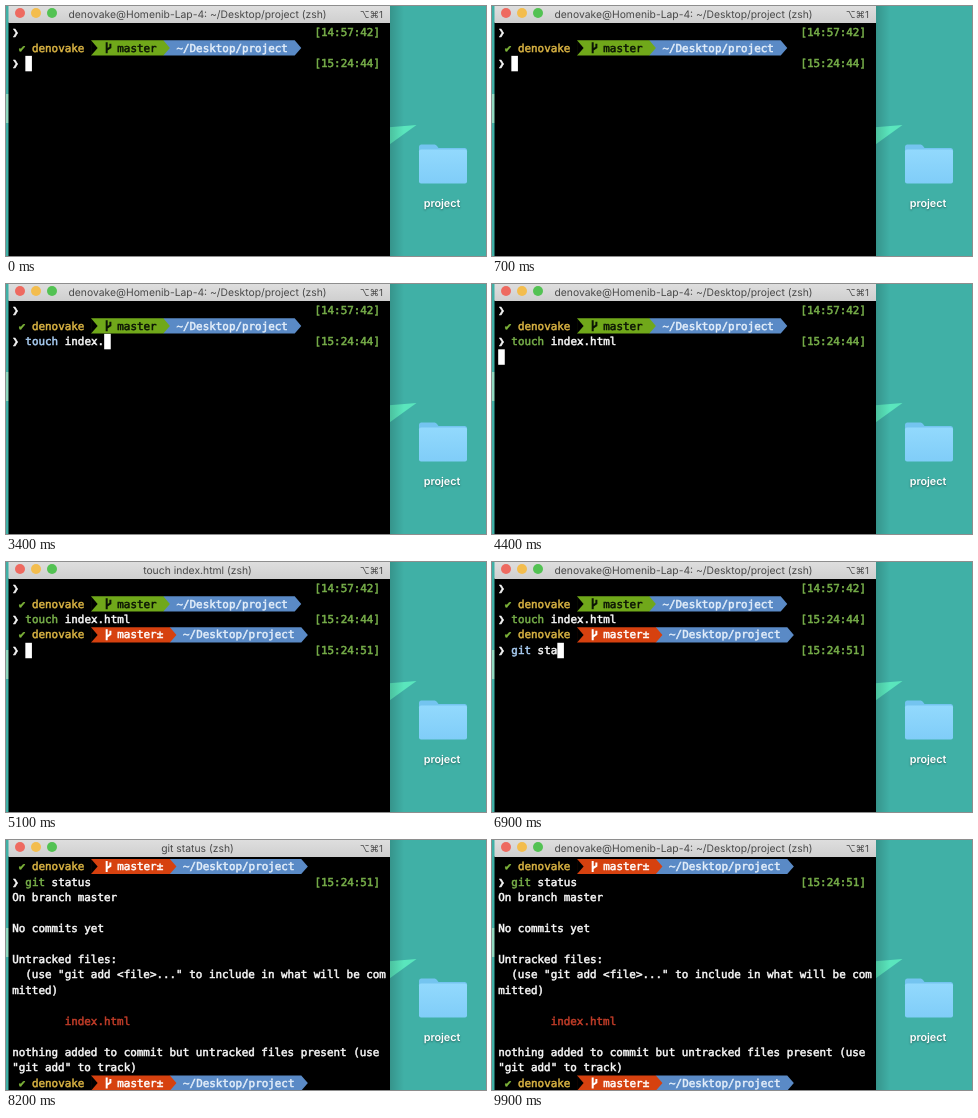
These frames come from a looping animation (480x250 px, 10 s). An HTML page:

```html
<!DOCTYPE html>
<html lang="en">
<head>
<meta charset="utf-8">
<title>Terminal</title>
<style>
  html, body { margin: 0; width: 100%; height: 100%; overflow: hidden; background: #40b0a6; }
  svg { display: block; }
  text { white-space: pre; text-rendering: geometricPrecision; }
  #term text { font: 10.9px "DejaVu Sans Mono", monospace; stroke-width: .5px; }
  .ui { font: 10.35px Inter, "Open Sans", sans-serif; fill: #484848; }
  .keys { font-size: 9.6px; }
  .label { font: 600 10.8px Inter, "Open Sans", sans-serif; fill: #fff; text-shadow: 0 1px 2px #0006; }
</style>
</head>
<body>
<svg width="480" height="250" viewBox="0 0 480 250">
  <defs>
    <linearGradient id="bar" x2="0" y2="1">
      <stop stop-color="#dedede"/><stop offset="1" stop-color="#cfcfcf"/>
    </linearGradient>
    <linearGradient id="shade">
      <stop stop-color="#000" stop-opacity=".16"/><stop offset="1" stop-color="#000" stop-opacity="0"/>
    </linearGradient>
    <linearGradient id="front" x2="0" y2="1">
      <stop stop-color="#92d9fd"/><stop offset="1" stop-color="#80cdf8"/>
    </linearGradient>
  </defs>

  <rect width="480" height="250" fill="#40b0a6"/>
  <path d="M0 88H3V117H0Z" fill="#8fd9c0"/>
  <path d="M380 121.500L410.500 119L380 141Z" fill="#5ae6bd"/>
  <rect x="384" width="14" height="250" fill="url(#shade)"/>

  <path d="M413 141q0-2.500 2.500-2.500h13q1.500 0 2.500 1.500l1.500 2h26q2.500 0 2.500 2.500V160H413Z" fill="#74c4f0"/>
  <rect x="413" y="143.500" width="48" height="34" rx="2" fill="url(#front)"/>
  <text class="label" x="436" y="201" text-anchor="middle">project</text>

  <rect x="2.500" y="16" width="381.500" height="234"/>
  <g id="term"></g>
  <rect x="2.500" width="381.500" height="17" fill="url(#bar)"/>
  <circle cx="14" cy="7" r="5" fill="#ee6a60"/>
  <circle cx="30" cy="7" r="5" fill="#f3bd4e"/>
  <circle cx="46" cy="7" r="5" fill="#53c253"/>
  <text class="ui" id="title" x="191.500" y="12" text-anchor="middle"></text>
  <text class="ui keys" x="377" y="12" text-anchor="end">⌥⌘1</text>
</svg>

<script>
const LOOP = 10000, CELL = 6.57, LINE = 15.47, LEFT = 6.2, TOP = 18.9;
const USER = "denovake", HOME = USER + "@Homenib-Lap-4: ~/Desktop/project (zsh)";
const WHITE = "#f8f8f8", GREEN = "#78b04a", BLUE = "#a9cdf3", RED = "#c03c28";
const term = document.getElementById("term"), title = document.getElementById("title");

const commands = [
  { text: "touch index.html", time: "15:24:44", enter: 4400, titled: [4900, 5200],
    keys: [1100, 1300, 1500, 1700, 1900, 2200, 2400, 2600, 2800, 3000, 3200, 3400, 3600, 3800, 4000, 4200] },
  { text: "git status", time: "15:24:51", enter: 7700, titled: [8000, 8300],
    keys: [5500, 5700, 5900, 6100, 6300, 6600, 6900, 7100, 7300, 7500] }
];

const output = [
  "On branch master", "", "No commits yet", "", "Untracked files:",
  '  (use "git add <file>..." to include in what will be com', "mitted)", "",
  "        index.html", "",
  "nothing added to commit but untracked files present (use", '"git add" to track)'
];

const colX = col => LEFT + col * CELL;
const escapeText = s => s.replace(/</g, "&lt;").replace(/>/g, "&gt;");

function put(col, s, color = WHITE) {
  return `<text x="${colX(col)}" y="11.2" fill="${color}" stroke="${color}">${escapeText(s)}</text>`;
}

// Bar between two columns, ending in an arrow tip one cell wide
function segment(from, to, color) {
  const a = colX(from), b = colX(to), h = 15.2;
  return `<path d="M${a} 0H${b}L${b + CELL} ${h / 2}L${b} ${h}H${a}Z" fill="${color}"/>`;
}

function prompt(dirty) {
  const branch = dirty ? "master±" : "master", end = 17 + branch.length;
  const ink = dirty ? "#fff" : "#0c1405", stem = colX(14) + 2.5;
  return put(1, "✔", "#7fb63a") + put(3, USER, "#d9b343") +
    segment(end, end + 20, "#5a8ac6") +
    segment(12, end, dirty ? "#d6410f" : "#70a81a") +
    segment(12, 12, "#000") +
    `<path d="M${stem} 2V13M${stem + 3.7} 3.500V7L${stem} 9.500" fill="none" stroke="${ink}" stroke-width="2"/>` +
    put(16, branch, ink) + put(end + 2, "~/Desktop/project", "#e3eefa");
}

const stamp = time => put(46, `[${time}]`, GREEN);
const cursor = col => `<rect x="${colX(col)}" width="${CELL}" height="${LINE}" fill="#fff"/>`;

function inputRow(cmd, t) {
  const typed = cmd.text.slice(0, cmd.keys.filter(k => k <= t).length);
  const [word] = typed.split(" "), done = t >= cmd.enter;
  return put(0, "❯") + put(2, word, done ? GREEN : BLUE) +
    put(2 + word.length, typed.slice(word.length)) +
    (done ? "" : cursor(2 + typed.length)) + stamp(cmd.time);
}

function screen(t) {
  const [touch, git] = commands;
  const rows = [put(0, "❯") + stamp("14:57:42"), prompt(false), inputRow(touch, t)];
  if (t >= touch.enter + 100) rows.push(prompt(true), inputRow(git, t));
  else if (t >= touch.enter) rows.push(cursor(0));
  if (t >= git.enter + 100) {
    rows.push(...output.map(s => put(0, s, s.endsWith(" index.html") ? RED : WHITE)));
    if (t >= git.enter + 200) rows.push(prompt(true), put(0, "❯") + cursor(2));
    else rows.push(cursor(0));
  } else if (t >= git.enter) rows.push(cursor(0));
  return rows.slice(-16)
    .map((row, i) => `<g transform="translate(0 ${TOP + i * LINE})">${row}</g>`).join("");
}

let shown = "";
function draw(now) {
  const t = now % LOOP, html = screen(t);
  if (html !== shown) term.innerHTML = shown = html;
  const running = commands.find(c => t >= c.titled[0] && t < c.titled[1]);
  title.textContent = running ? running.text + " (zsh)" : HOME;
}

let start;
function tick(now) {
  start ??= now;
  draw(now - start);
  requestAnimationFrame(tick);
}
draw(0);
requestAnimationFrame(tick);
</script>
</body>
</html>
```
